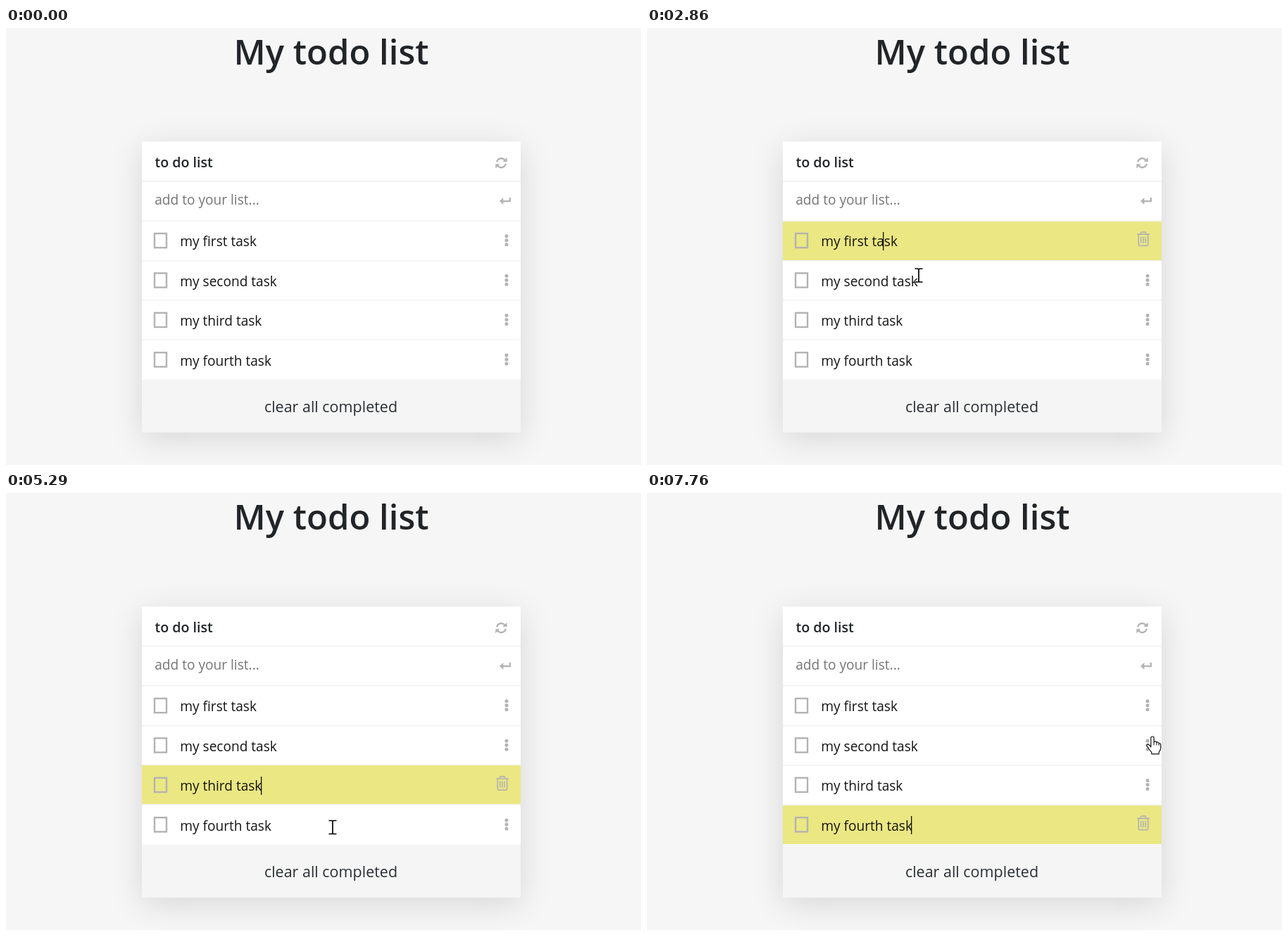
An HTML page with a canvas that plays this animation: 902 px wide and 621 px high, repeating every 8000 ms.

```html
<!DOCTYPE html>
<html lang="en">
<head>
<meta charset="utf-8">
<title>My todo list</title>
<style>
  html, body { margin: 0; width: 100%; height: 100%; overflow: hidden; background: #f6f6f6; }
  canvas { display: block; width: 902px; height: 621px; }
</style>
</head>
<body>
<canvas id="stage" width="902" height="621"></canvas>
<script>
const c = document.getElementById('stage').getContext('2d');
const LOOP = 8000, PITCH = 56.4, GREY = '#b3b3b3';
const FONT = '"Open Sans", "Noto Sans", sans-serif';
const tasks = ['my first task', 'my second task', 'my third task', 'my fourth task'];

// Row focus: start time, row, caret x, times at which the caret toggles
const focus = [
  { at: 1880, row: 0, x: 335, blink: [2400, 2860] },
  { at: 3120, row: 1, x: 384, blink: [3660] },
  { at: 4210, row: 2, x: 362, blink: [4740, 5290] },
  { at: 5490, row: 3, x: 375, blink: [6020, 6570, 7110, 7620] }
];

// Pointer moves: time span, number of steps, from, to, downward bulge
const moves = [
  { t: [310, 450], n: 3, from: [643.5, 470.5], to: [522, 397] },
  { t: [670, 870], n: 4, from: [522, 397], to: [314, 280] },
  { t: [1070, 1260], n: 4, from: [314, 280], to: [340, 302.5] },
  { t: [2400, 2600], n: 4, from: [340, 302.5], to: [386, 351.5] },
  { t: [3520, 3730], n: 4, from: [386, 351.5], to: [413, 415] },
  { t: [4610, 5020], n: 7, from: [413, 415], to: [464, 475] },
  { t: [5880, 6370], n: 8, from: [464, 475], to: [730.5, 470.5], bulge: 14 },
  { t: [6570, 6780], n: 4, from: [730.5, 470.5], to: [719, 472.5] },
  { t: [7110, 7760], n: 10, from: [719, 472.5], to: [718, 345.5] }
];

function text(s, x, y, size, color, weight = 400, align = 'left') {
  c.font = `${weight} ${size}px ${FONT}`;
  c.textAlign = align;
  c.fillStyle = color;
  c.fillText(s, x, y);
}

function rect(x, y, w, h, color) {
  c.fillStyle = color;
  c.fillRect(x, y, w, h);
}

function at(x, y, draw) {
  c.save();
  c.translate(x, y);
  draw();
  c.restore();
}

function outline(d, width, color, fill) {
  const p = new Path2D(d);
  if (fill) { c.fillStyle = fill; c.fill(p); }
  c.lineWidth = width;
  c.strokeStyle = color;
  c.stroke(p);
}

function refreshIcon() {
  for (let i = 0; i < 2; i++) {
    c.beginPath();
    c.arc(0, 0, 6.5, Math.PI * 1.06, Math.PI * 1.78);
    c.lineWidth = 2.4;
    c.strokeStyle = GREY;
    c.stroke();
    c.fillStyle = GREY;
    c.fill(new Path2D('M8.2 -7.8V-1.6H2Z'));
    c.rotate(Math.PI);
  }
}

function enterIcon() {
  outline('M14.8 -4.5V0.6H4', 2.3, GREY);
  c.fillStyle = GREY;
  c.fill(new Path2D('M0 0.6L5.4 -4.4V5.6Z'));
}

function trashIcon() {
  c.lineJoin = 'round';
  outline('M-9 -6.8H9M-4.2 -7L-3 -10H3L4.2 -7M-6.7 -6.5V7.8Q-6.7 9.4 -5.2 9.4H5.2Q6.7 9.4 6.7 7.8V-6.5', 1.7, GREY);
  outline('M-3.2 -3.3V5.8M0 -3.3V5.8M3.2 -3.3V5.8', 1.5, GREY);
}

function dots() {
  c.fillStyle = GREY;
  for (const y of [-6, 0, 6]) {
    c.beginPath();
    c.arc(0, y, 2.5, 0, Math.PI * 2);
    c.fill();
  }
}

const pointers = {
  beam() {
    const d = 'M-5.5 -9.5H-2Q0 -9.5 0 -8Q0 -9.5 2 -9.5H5.5M0 -8V8M-5.5 9.5H-2Q0 9.5 0 8Q0 9.5 2 9.5H5.5';
    outline(d, 3, 'rgba(255,255,255,.8)');
    outline(d, 1.7, '#000');
  },
  arrow() {
    c.lineJoin = 'miter';
    outline('M0 0.8V19L4.3 15.2L7.2 21.8L10.3 20.4L7.4 14H13.2Z', 1.1, '#222', '#fff');
  },
  hand() {
    c.lineJoin = 'round';
    outline('M-2.2 15.5V2.4Q-2.2 0.5 0 0.5Q2.1 0.5 2.1 2.4V8.6Q2.4 7.3 4 7.4Q5.8 7.5 5.9 9.3' +
      'Q6.4 8.2 7.6 8.5Q9 8.8 9.1 10.4Q11.6 9.7 11.7 12.4V17Q11.5 20.5 9.2 22.6V25.3H-1.2V23' +
      'Q-3.7 20.5 -5.6 17.2L-7.8 14.2Q-8.6 12.4 -7 11.7Q-5.6 11.3 -4.2 13Z', 1.2, '#111', '#fff');
    outline('M2.1 8.5V13M5.9 9.5V13M9.1 10.5V13.5', 1, '#111');
  }
};

function pointerAt(t) {
  const m = moves.filter(m => t >= m.t[0]).pop();
  if (!m) return null;
  const gap = (m.t[1] - m.t[0]) / (m.n - 1);
  const k = Math.min(m.n, Math.floor((t - m.t[0]) / gap + 1e-6) + 1) / m.n;
  const [x, y] = m.from.map((v, i) => v + (m.to[i] - v) * k);
  const shape = x < 690 ? 'beam' : x > 725 ? 'arrow' : 'hand';
  return { x, y: y + (m.bulge || 0) * Math.sin(Math.PI * k), shape };
}

function card() {
  rect(0, 0, 902, 621, '#f6f6f6');
  text('My todo list', 462, 52, 49, '#212529', 600, 'center');
  c.save();
  c.shadowColor = 'rgba(0,0,0,.13)';
  c.shadowBlur = 44;
  c.shadowOffsetY = 9;
  rect(193, 161.5, 538, 413, '#fff');
  c.restore();
  rect(193, 499.5, 538, 75, '#f5f5f5');
  for (let i = 0; i < 5; i++) rect(193, Math.round(216.8 + i * PITCH), 538, 1.5, '#f1f1f1');
  text('to do list', 211.5, 197.5, 19.6, '#212529', 600);
  text('add to your list...', 211.2, 251, 19.1, '#757575');
  text('clear all completed', 461.5, 546, 21.5, '#2b2f33', 400, 'center');
  at(703.5, 191.7, refreshIcon);
  at(701, 245.5, enterIcon);
}

function row(i, active) {
  const dy = i * PITCH;
  if (active) rect(193, Math.round(274.6 + dy), 538, 55, '#ebe783');
  c.lineWidth = 2.4;
  c.strokeStyle = GREY;
  c.strokeRect(211, 292 + dy, 17, 20.2);
  text(tasks[i], 247.2, 310.3 + dy, 19.1, '#151515');
  if (active) at(705, 300 + dy, trashIcon);
  else at(711, 301.8 + dy, dots);
}

function draw(t) {
  card();
  const f = focus.filter(f => t >= f.at).pop();
  tasks.forEach((_, i) => row(i, f && f.row === i));
  if (f && f.blink.filter(b => t >= b).length % 2 === 0) {
    rect(f.x, Math.round(290 + f.row * PITCH), 1.3, 26, '#111');
  }
  const p = pointerAt(t);
  if (p) at(p.x, p.y, pointers[p.shape]);
}

const start = performance.now();
function tick() {
  draw((performance.now() - start) % LOOP);
  requestAnimationFrame(tick);
}
tick();
</script>
</body>
</html>
```
